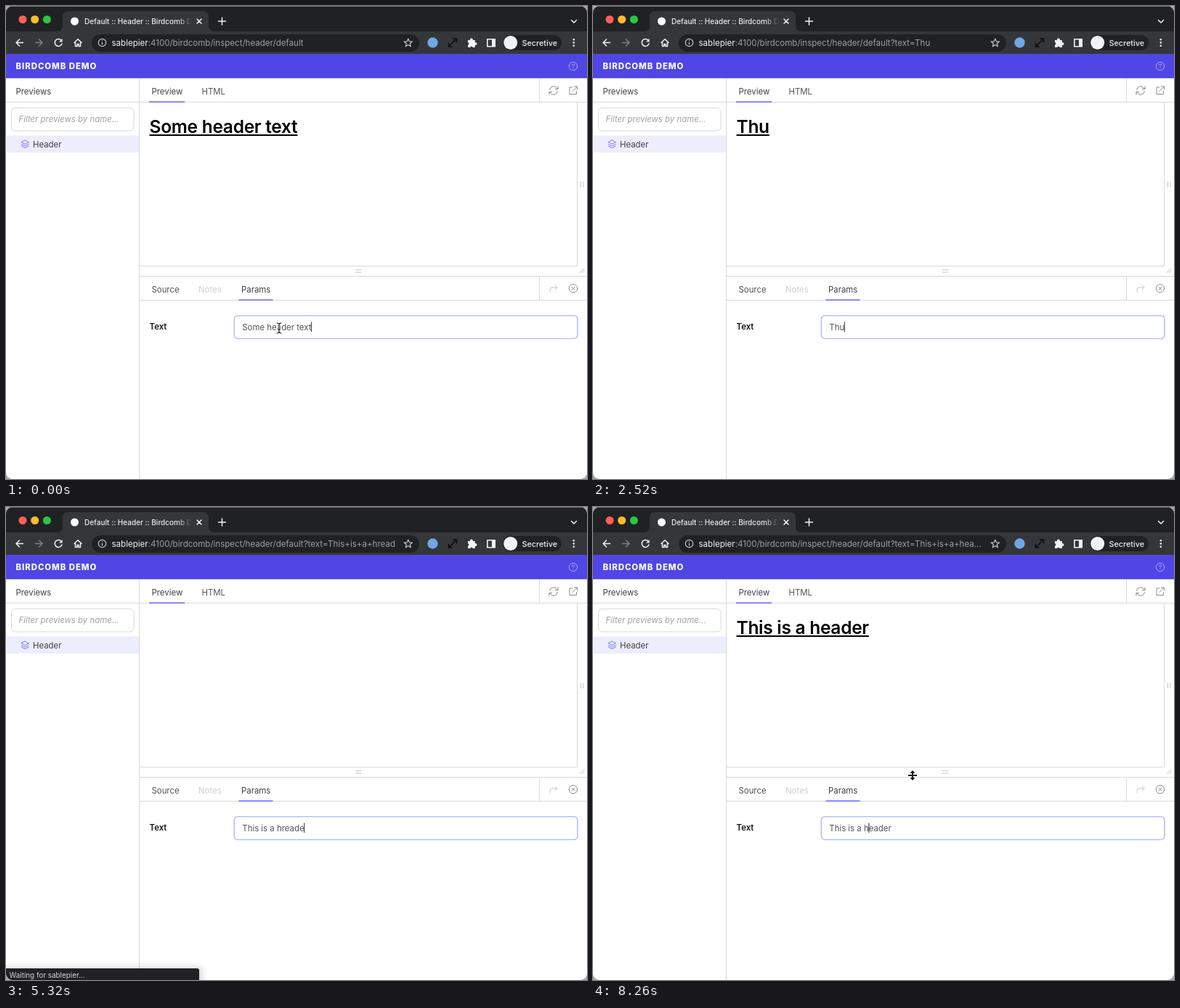
These frames come from a looping animation (800x652 px, 8.33 s). An HTML page:

```html
<!DOCTYPE html>
<html lang="en">
<head>
<meta charset="utf-8">
<title>Preview panel</title>
<style>
  html, body { margin: 0; width: 100%; height: 100%; overflow: hidden; background: #a9a9ab; }
  svg { display: block; width: 800px; height: 652px; }
  text {
    font: 11.4px Inter, "Open Sans", sans-serif;
    font-feature-settings: "calt" 0;
    font-optical-sizing: none;
    white-space: pre;
    fill: #52525b;
  }
  .line { stroke: #d9d9dc; fill: none; }
  .icon { fill: none; stroke-linecap: round; stroke-linejoin: round; }
  .bar { stroke: #f1f3f4; stroke-width: 1.5; }
  .tool { stroke: #8b8b92; }
  .dark { fill: #202124; }
  .light { fill: #f1f3f4; }
  #heading { font-size: 24.5px; font-weight: 600; letter-spacing: -.28px; fill: #000; }
  .url { font-size: 11.55px; fill: #9aa0a6; }
  .chrome { font-size: 10px; font-weight: 500; fill: #eceef0; }
</style>
</head>
<body>
<svg viewBox="0 0 800 652">
  <defs>
    <clipPath id="window"><rect width="800" height="652" rx="9"/></clipPath>
    <linearGradient id="fade">
      <stop offset="0" stop-color="#35363a" stop-opacity="0"/>
      <stop offset="1" stop-color="#35363a"/>
    </linearGradient>
    <filter id="blur" x="-10%" y="-80%" width="120%" height="260%"><feGaussianBlur stdDeviation="4"/></filter>
  </defs>

  <g clip-path="url(#window)">
    <rect width="800" height="652" fill="#fff"/>

    <!-- Browser frame -->
    <rect width="800" height="66" class="dark"/>
    <rect width="800" height="1" fill="#6b6c70"/>
    <path d="M0 35H70Q78 35 78 27V15Q78 7 86 7H271Q279 7 279 15V27Q279 35 287 35H800V66H0Z" fill="#35363a"/>
    <circle cx="23" cy="18.5" r="5.5" fill="#ff5f57"/>
    <circle cx="39.7" cy="18.5" r="5.5" fill="#febc2e"/>
    <circle cx="56.4" cy="18.5" r="5.5" fill="#28c840"/>
    <circle cx="94.5" cy="21" r="5.5" fill="#fff"/>
    <text class="chrome" x="108" y="24.5">Default :: Header :: Birdcomb D</text>
    <rect x="236" y="12" width="20" height="18" fill="url(#fade)"/>
    <rect x="256" y="12" width="22" height="18" fill="#35363a"/>
    <g class="icon bar">
      <path d="M263 18l6 6m0-6l-6 6M292.500 21h10m-5-5v10M778.500 19.500l3.500 3.500 3.500-3.500"/>
      <path d="M23.500 50.500h-9.500m4.500-4.500l-4.500 4.500 4.500 4.500"/>
      <path d="M40.500 50.500h9.500m-4.500-4.500l4.500 4.500-4.500 4.500" stroke="#7d8085" style="stroke:#7d8085"/>
      <path d="M76.300 47.500A5 5 0 1 0 77 52"/>
      <path d="M94 50.500l5-4.800 5 4.800M95.500 50v5.500h2.500v-3h2v3h2.500V50"/>
    </g>
    <path d="M77.600 45v4.500h-4.500Z" class="light"/>

    <rect x="118" y="39" width="451" height="24" rx="12" class="dark"/>
    <g class="icon" stroke="#c3c6ca" stroke-width="1.200">
      <circle cx="132.500" cy="50.500" r="5.200"/>
      <path d="M132.500 50v3m0-5.300v.1"/>
      <path id="star"/>
    </g>
    <text class="url" x="145.500" y="54.500"><tspan class="light">sablepier</tspan><tspan id="path"></tspan></text>

    <circle cx="587.500" cy="50.500" r="7.200" fill="#6fa8e6"/>
    <g class="icon" stroke="#0d0d0e" stroke-width="1.700">
      <path d="M609.500 56l11-11m-4.500 0h4.500v4.500M609.500 51.500V56h4.500"/>
    </g>
    <path class="light" d="M636 47h3a2 2 0 1 1 3.800 0h3v3.200a2 2 0 1 1 0 3.800v3h-3.200a1.800 1.800 0 0 0-3.400 0H636v-3.200a1.800 1.800 0 0 0 0-3.500Z"/>
    <path class="light" fill-rule="evenodd" d="M662 45h12v11.500h-12ZM663.600 46.600V55h5.400v-8.400Z"/>
    <rect x="684" y="40" width="81" height="21" rx="10.500" class="dark"/>
    <circle cx="694.700" cy="50.500" r="9.500" fill="#f1f3f4"/>
    <text class="chrome" x="710.500" y="54.500" style="font-size:10.800px">Secretive</text>
    <g class="light">
      <circle cx="781.800" cy="46.300" r="1.300"/>
      <circle cx="781.800" cy="50.500" r="1.300"/>
      <circle cx="781.800" cy="54.700" r="1.300"/>
    </g>

    <!-- Application header -->
    <rect y="66" width="800" height="33" fill="#4f46e5"/>
    <rect y="98.500" width="800" height="1" fill="#4338ca"/>
    <text x="13.500" y="87" style="font-weight:800;letter-spacing:.95px;fill:#fff">BIRDCOMB DEMO</text>
    <g class="icon" stroke="#a9a4f6">
      <circle cx="781" cy="83" r="5.700"/>
      <path d="M779.300 81.700q.2-1.700 1.800-1.700 1.700.1 1.700 1.500 0 1-1.800 1.800m0 2.300v.1"/>
    </g>

    <!-- Sidebar -->
    <text x="13.500" y="122" style="fill:#3f3f46">Previews</text>
    <rect x="7.500" y="140.500" width="168.500" height="31.500" rx="5" class="line"/>
    <text x="17.500" y="160" style="font-style:italic;fill:#a1a1aa">Filter previews by name...</text>
    <rect x="1" y="178.500" width="182" height="23.500" fill="#eceefd"/>
    <g class="icon" stroke="#7376f0">
      <path d="M26.300 185.200l5 2.600-5 2.600-5-2.600ZM21.300 190.500l5 2.600 5-2.600M21.300 193l5 2.600 5-2.600"/>
    </g>
    <text x="37" y="194.500" style="fill:#3f3f46">Header</text>

    <!-- Panes -->
    <path class="line" d="M183.500 100V652M0 132.500H800M734.500 100V132M786.500 133V358.500M184 358.500H787M184 372.500H800M184 405.500H800M734.500 373V405"/>
    <text x="200.500" y="122" style="fill:#3f3f46">Preview</text>
    <text x="269.500" y="122">HTML</text>
    <text x="200.500" y="395">Source</text>
    <text x="265" y="395" style="fill:#cfcfd4">Notes</text>
    <text x="324" y="395" style="fill:#3f3f46">Params</text>
    <path d="M197 132.300H246M320.500 405.300H367.500" stroke="#6366f1" stroke-width="1.600"/>
    <path d="M481 363.700h8.500m-8.500 3.300h8.500M791.500 242v8m3.500-8v8M789.500 368l7-6.500m-3.500 6.500l3.500-3.300" stroke="#c4c4c8" fill="none"/>
    <g class="icon tool">
      <path d="M748.500 115.500a5.600 5.600 0 0 1 10-2.500l1.500 1.500m0-3.700v3.700h-3.700M759.500 117.500a5.600 5.600 0 0 1-10 2.500l-1.500-1.500m0 3.700v-3.700h3.700"/>
      <path d="M780 112h-4v9.500h9.500v-4M782.500 111h4v4m0-4l-6.500 6.500"/>
      <circle cx="781" cy="389.300" r="5.700"/>
      <path d="M779 387.300l4 4m0-4l-4 4"/>
      <path d="M749 394v-3q0-3 3-3h7m-3-3l3 3-3 3" style="stroke:#cacace"/>
    </g>

    <text id="heading" x="197.500" y="174.500"></text>
    <rect id="rule" x="197.500" y="177" height="2" fill="#000"/>

    <text x="197.500" y="445.500" style="font-weight:600;fill:#18181b">Text</text>
    <rect x="314.300" y="426.700" width="472.700" height="31.800" rx="5" fill="#fff" stroke="#b3c0fb" stroke-width="1.600"/>
    <text id="field" x="325.300" y="446.500"></text>
    <path id="spell" stroke="#e5484d" stroke-width="1.400" stroke-dasharray="1.500 1.500"/>
    <rect id="caret" y="435.500" width="1" height="13.500" fill="#27272a"/>

    <!-- Loading bubble -->
    <g id="status">
      <rect x="-10" y="634" width="280" height="30" rx="4" fill="#000" opacity=".16" filter="url(#blur)"/>
      <rect x="-5" y="636" width="271" height="24" rx="3" class="dark"/>
      <text class="chrome" x="4.500" y="648.500" style="font-size:9.900px;font-weight:400;fill:#d5d7da">Waiting for sablepier...</text>
    </g>

    <!-- Mouse pointers -->
    <g id="mouse">
      <g id="beam" class="icon">
        <path id="beamHalo" d="M-3-7q3 0 3 2.500 0-2.500 3-2.500M0-4.500V4.500M-3 7q3 0 3-2.500 0 2.500 3 2.500M-1.500 2h3" stroke="#fff" stroke-width="2.600"/>
        <path d="M-3-7q3 0 3 2.500 0-2.500 3-2.500M0-4.500V4.500M-3 7q3 0 3-2.500 0 2.500 3 2.500M-1.500 2h3" stroke="#111" stroke-width="1.100"/>
      </g>
      <path id="arrow" d="M0 0V13l3-2.700 2 4.500 2-.9-2-4.400h4Z" fill="#000" stroke="#fff"/>
      <path id="resize" d="M0-7l3.500 4H1v2h5V1H1V3h2.500L0 7-3.500 3H-1V1H-6V-1h5V-3h-2.500Z" fill="#111" stroke="#fff" stroke-width="1.600" paint-order="stroke"/>
    </g>
  </g>
</svg>
<script>
const LOOP = 8330, STEP = 70;
const $ = id => document.getElementById(id);
const START = 'Some header text', WRONG = 'This is a hreader', RIGHT = 'This is a header';
const FIELD_X = 325.3, FIX = 11;

// Each typed state is [time, field content].
const typing = (start, gap, base, added) =>
  [...added].map((c, i) => [start + i * gap, base + added.slice(0, i + 1)]);
const typed = [
  [0, START], [1050, 'T'], [1260, 'Th'], [2100, 'Thu'], [2800, 'Th'],
  ...typing(2940, 117, 'Th', 'is is a '),
  ...typing(4550, 140, 'This is a ', 'hread'),
  [5250, 'This is a hreade'], [5390, WRONG], [7000, RIGHT]
];

// Each page load is [time, submitted text, time until it is drawn].
const loads = [
  [0, START, 0], [1400, 'Th', 210], [2240, 'Thu', 140], [3220, 'This', 140],
  [3640, 'This is', 140], [4130, 'This is a ', 140],
  [5180, 'This is a hread', 420], [5600, WRONG, 140], [7140, RIGHT, 210]
];

const latest = (list, t) => list.filter(item => item[0] <= t).pop();
const between = (t, a, b) => t >= a && t < b;
const show = (id, on) => $(id).style.display = on ? '' : 'none';

function setText(id, value) {
  const node = $(id);
  if (node.textContent !== value) node.textContent = value;
  return node;
}

function textWidth(node, count) {
  return count ? node.getSubStringLength(0, count) : 0;
}

function address(text) {
  if (text === START) return '';
  const query = text.replace(/ /g, '+');
  return '?text=' + (query.length > 15 ? query.slice(0, 13) + '...' : query);
}

function drawPage(t) {
  const [time, text, delay] = latest(loads, t);
  const shown = t - time >= delay ? text.trim() : '';
  const heading = setText('heading', shown);
  $('rule').setAttribute('width', textWidth(heading, shown.length));
  setText('path', ':4100/birdcomb/inspect/header/default' + address(text));
  show('status', between(t, 1540, 2170) || between(t, 5180, 5740));
}

function drawField(t) {
  const [time, text] = latest(typed, t);
  const field = setText('field', text);
  let pos = text.length, lastKey = time;
  if (t >= 6300) {
    const moved = Math.min(6, Math.floor((t - 6300) / STEP) + 1);
    pos = WRONG.length - moved;
    lastKey = Math.max(time, 6300 + (moved - 1) * STEP);
  }
  if (text === RIGHT) pos = FIX;
  $('caret').setAttribute('x', FIELD_X + textWidth(field, pos) - .3);
  show('caret', (t - lastKey) % 1000 < 500);

  const flagged = between(t, 6300, 7000);
  show('spell', flagged);
  if (flagged) {
    const from = FIELD_X + textWidth(field, 10), to = FIELD_X + textWidth(field, text.length);
    $('spell').setAttribute('d', `M${from} 448H${to}`);
  }
}

function drawMouse(t) {
  const p = Math.max(0, Math.min(1, (t - 7700) / 490));
  const ease = p * p * (3 - 2 * p);
  const x = 376 + 64 * ease, y = 444 - 74 * ease;
  show('mouse', t < 1050 || t >= 7700);
  $('mouse').setAttribute('transform', `translate(${x} ${y})`);
  show('beam', y > 427);
  show('arrow', y <= 427 && y > 373);
  show('resize', y <= 373);
}

function draw() {
  const t = Math.floor(performance.now() % LOOP / STEP) * STEP;
  drawPage(t);
  drawField(t);
  drawMouse(t);
  requestAnimationFrame(draw);
}

const star = Array.from({ length: 10 }, (_, i) => {
  const r = i % 2 ? 2.6 : 6, a = (i / 5 - .5) * Math.PI;
  return `${553.8 + r * Math.cos(a)} ${51 + r * Math.sin(a)}`;
});
$('star').setAttribute('d', `M${star.join('L')}Z`);
draw();
</script>
</body>
</html>
```
